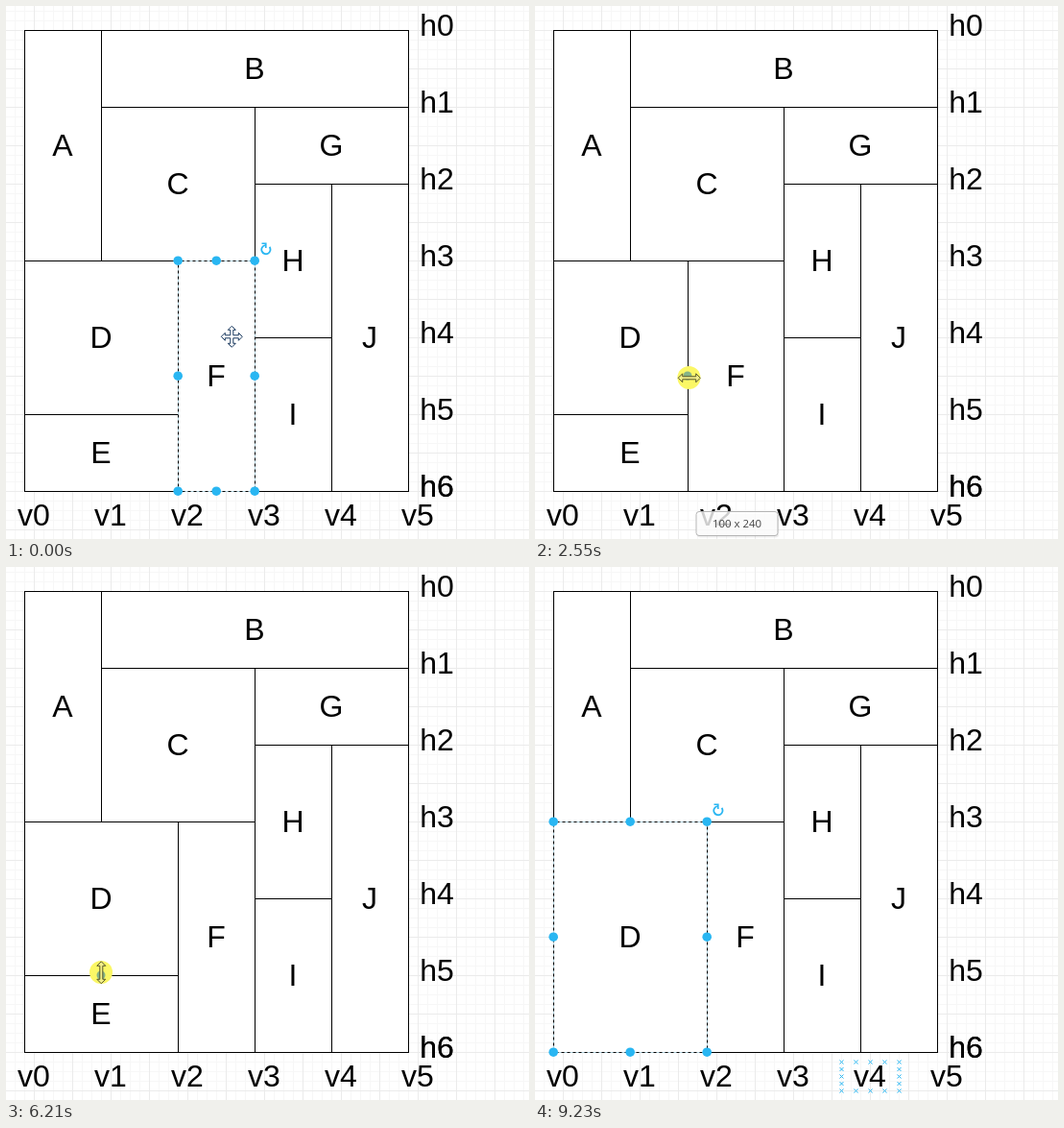
Recreate the animation shown at these times as an HTML page. Size 545 by 555 pixels, loop 9300 ms.

```html
<!DOCTYPE html>
<html lang="en">
<head>
<meta charset="utf-8">
<title>Resizing a floor plan</title>
<style>
  html, body { margin: 0; width: 100%; height: 100%; overflow: hidden; background: #fff; }
  svg { display: block; }
  .cell { fill: #fff; stroke: #000; }
  .label { font: 32px "Liberation Sans", Arial, sans-serif; text-anchor: middle; }
  .tip { font: 11.4px "Open Sans", "Noto Sans", sans-serif; text-anchor: middle; fill: #444; }
  .cursor { fill: #fff; stroke: #222; stroke-linejoin: miter; }
</style>
</head>
<body>
<svg id="stage" width="545" height="555" viewBox="0 0 545 555"></svg>
<script>
const LOOP = 9300;
const BLUE = '#29b6f2';
const stage = document.getElementById('stage');

function add(parent, tag, attrs = {}, text) {
  const el = document.createElementNS('http://www.w3.org/2000/svg', tag);
  set(el, attrs);
  if (text) el.textContent = text;
  parent.appendChild(el);
  return el;
}
function set(el, attrs) {
  for (const key in attrs) el.setAttribute(key, attrs[key]);
}
function show(el, on) {
  el.style.display = on ? '' : 'none';
}

// Grid: fine lines every 10, stronger ones every 40.
function gridLines(step, x0, y0, color) {
  let d = '';
  for (let x = x0; x < 545; x += step) d += `M${x + 0.5} 0V555`;
  for (let y = y0; y < 555; y += step) d += `M0 ${y + 0.5}H545`;
  add(stage, 'path', { d, stroke: color, fill: 'none' });
}
gridLines(10, 9, 5, '#f7f7f7');
gridLines(40, 29, 25, '#ebebeb');

// The plan has its own origin at the top left corner.
const plan = add(stage, 'g', { transform: 'translate(19.5 25.5)' });

function label(text, x, y) {
  return add(plan, 'text', { class: 'label', x, y: y + 11 }, text);
}
for (let i = 0; i < 7; i++) label('h' + i, 429.5, i * 80 - 5.5);
label('h6', 429.5, 474.5);
for (let i = 0; i < 6; i++) label('v' + i, 9.5 + i * 80, 504.5);

const rooms = {
  A: [0, 0, 80, 240], B: [80, 0, 320, 80], C: [80, 80, 160, 160],
  G: [240, 80, 160, 80], H: [240, 160, 80, 160], I: [240, 320, 80, 160],
  J: [320, 160, 80, 320], E: [0, 400, 160, 80], D: [0, 240, 160, 160],
  F: [160, 240, 80, 240]
};
const parts = {};
for (const name in rooms) {
  parts[name] = { rect: add(plan, 'rect', { class: 'cell' }), text: label(name, 0, 0) };
  place(name, rooms[name]);
}
function place(name, [x, y, width, height]) {
  set(parts[name].rect, { x, y, width, height });
  set(parts[name].text, { x: x + width / 2 - 0.5, y: y + height / 2 + 10.5 });
}

// Connection points: small crosses on a box outline, every quarter side.
function crosses(x, y, w, h) {
  let d = '';
  for (let i = 0; i <= 4; i++) for (let j = 0; j <= 4; j++) {
    if (i % 4 && j % 4) continue;
    d += `M${x + w * i / 4 - 2} ${y + h * j / 4 - 2}l4 4m0 -4l-4 4`;
  }
  return add(plan, 'path', { d, stroke: BLUE, fill: 'none' });
}
const roomPoints = crosses(0, 240, 160, 160);
const labelPoints = crosses(300, 490, 60, 30);

const arrow = add(plan, 'rect', { x: -20, width: 11.5, height: 4, fill: '#d3effb' });

// Selection: dashed frame, eight handles and a rotate icon.
const selection = add(plan, 'g');
const frame = add(selection, 'rect', {
  fill: 'none', stroke: '#b4d4e0', 'stroke-dasharray': '3 3'
});
const handles = [];
for (let i = 0; i < 9; i++) {
  if (i !== 4) handles.push({
    u: i % 3 / 2, v: Math.floor(i / 3) / 2,
    el: add(selection, 'circle', { r: 4.8, fill: BLUE })
  });
}
const spin = add(selection, 'g', { fill: 'none', stroke: BLUE, 'stroke-width': 1.8 });
add(spin, 'path', { d: 'M3.6 -2.6A4.6 4.6 0 1 1 -1 -4.4' });
add(spin, 'path', { d: 'M-4.5 -6.3H-0.2V-1.6', 'stroke-width': 1.6 });

function select([x, y, width, height]) {
  set(frame, { x, y, width, height });
  for (const { u, v, el } of handles) {
    set(el, { cx: x + u * width - 0.3, cy: y + v * height - 0.3 });
  }
  set(spin, { transform: `translate(${x + width + 11.5} ${y - 12})` });
}

const tip = add(stage, 'g');
const tipShade = add(tip, 'rect', { height: 25, rx: 3, fill: '#000', opacity: 0.07 });
const tipBox = add(tip, 'rect', {
  height: 25, rx: 3, fill: '#fff', 'fill-opacity': 0.8, stroke: '#b5b5b5'
});
const tipText = add(tip, 'text', { class: 'tip' });

function showTip([x, y, w, h]) {
  const text = `${w} x ${h}`;
  const width = 22 + 7 * text.length;
  const cx = 20.5 + x + w / 2;
  const top = y + h + 46.5;
  set(tipShade, { x: cx - width / 2 + 1, y: top + 2, width });
  set(tipBox, { x: cx - width / 2, y: top, width });
  set(tipText, { x: cx, y: top + 16.5 });
  tipText.textContent = text;
}

const glow = add(stage, 'circle', { r: 12, fill: '#fbf766' });
const grip = add(stage, 'circle', { r: 4.5, fill: '#86b487' });

const cursor = add(stage, 'path', { class: 'cursor' });
const shapes = {
  move: 'M0 -11L4 -7H1.5V-1.5H7V-4L11 0L7 4V1.5H1.5V7H4L0 11L-4 7H-1.5V1.5H-7V4L-11 0L-7 -4V-1.5H-1.5V-7H-4Z',
  ew: 'M-11.5 0L-7 -4.5V-1.5H7V-4.5L11.5 0L7 4.5V1.5H-7V4.5Z',
  ns: 'M0 -11.5L4.5 -7H1.5V7H4.5L0 11.5L-4.5 7H-1.5V-7H-4.5Z'
};

// Each move: start, end, steps, target x, target y, ease-out power.
const moves = [
  [70, 820, 12, 180, 386, 1.2],
  [1550, 1550, 1, 178, 387, 1],
  [1760, 2080, 6, 138, 387, 1.32],
  [2350, 2750, 7, 175, 387, 1.1],
  [3760, 3760, 1, 178, 387, 1],
  [3820, 3890, 2, 184, 387, 1],
  [4230, 4230, 1, 179, 387, 1],
  [4290, 4560, 5, 140, 388, 1.3],
  [5490, 5940, 8, 99, 422, 1.2],
  [6610, 7480, 14, 97, 498, 1.6],
  [7560, 7560, 1, 97, 501, 1],
  [8420, 8630, 4, 348, 541, 1]
];
function pointer(t) {
  let x = 235, y = 344;
  for (const [start, end, steps, tx, ty, power] of moves) {
    if (t < start) break;
    const gap = (end - start) / (steps - 1) || 1;
    const done = Math.min(steps, 1 + Math.floor((t - start) / gap + 0.15)) / steps;
    const k = 1 - Math.pow(1 - done, power);
    x += (tx - x) * k;
    y += (ty - y) * k;
  }
  return [x, y];
}

const within = (t, a, b) => t >= a && t < b;
const snap = v => Math.round(v / 10) * 10;

function draw(t) {
  const [x, y] = pointer(t);
  const dragF = within(t, 1550, 4290);
  const dragD = within(t, 6210, 8020);

  const dx = dragF ? snap(x - 178) : 0;
  const roomF = [160 + dx, 240, 80 - dx, 240];
  const dy = t >= 8020 ? 80 : dragD ? snap(y - 422) : 0;
  const roomD = [0, 240, 160, 160 + dy];
  place('F', roomF);
  place('D', roomD);

  const pickedF = t < 1620 || within(t, 4360, 5160);
  const pickedD = within(t, 5220, 6210) || t >= 8150;
  show(selection, pickedF || pickedD);
  select(pickedF ? roomF : roomD);

  show(roomPoints, within(t, 4430, 5090));
  show(labelPoints, t >= 8630);
  show(arrow, within(t, 4950, 5090) || within(t, 5290, 6210) || within(t, 8150, 8420));
  set(arrow, { y: 238 + roomD[3] / 2 });

  const tipF = within(t, 1760, 4290);
  const tipD = within(t, 6610, 8020);
  show(tip, tipF || tipD);
  if (tipF || tipD) showTip(tipF ? roomF : roomD);

  show(glow, dragF || dragD || within(t, 5090, 5220));
  set(glow, { cx: x, cy: y });
  show(grip, dragF || dragD);
  set(grip, dragF ? { cx: 179 + dx, cy: 385 } : { cx: 99, cy: 425 + dy });

  const shape = within(t, 815, 4360) ? 'ew' : within(t, 5875, 8420) ? 'ns' : 'move';
  show(cursor, t < 8700);
  set(cursor, {
    d: shapes[shape],
    transform: `translate(${x + 0.3} ${y + 0.3})`,
    style: dragF || dragD ? 'fill:#f3ef8a;stroke:#55552a' : t < 815 ? 'stroke:#16365c' : ''
  });
  show(cursor, t < 8700);
}

const began = performance.now();
function tick() {
  draw((performance.now() - began) % LOOP);
  requestAnimationFrame(tick);
}
tick();
</script>
</body>
</html>
```
